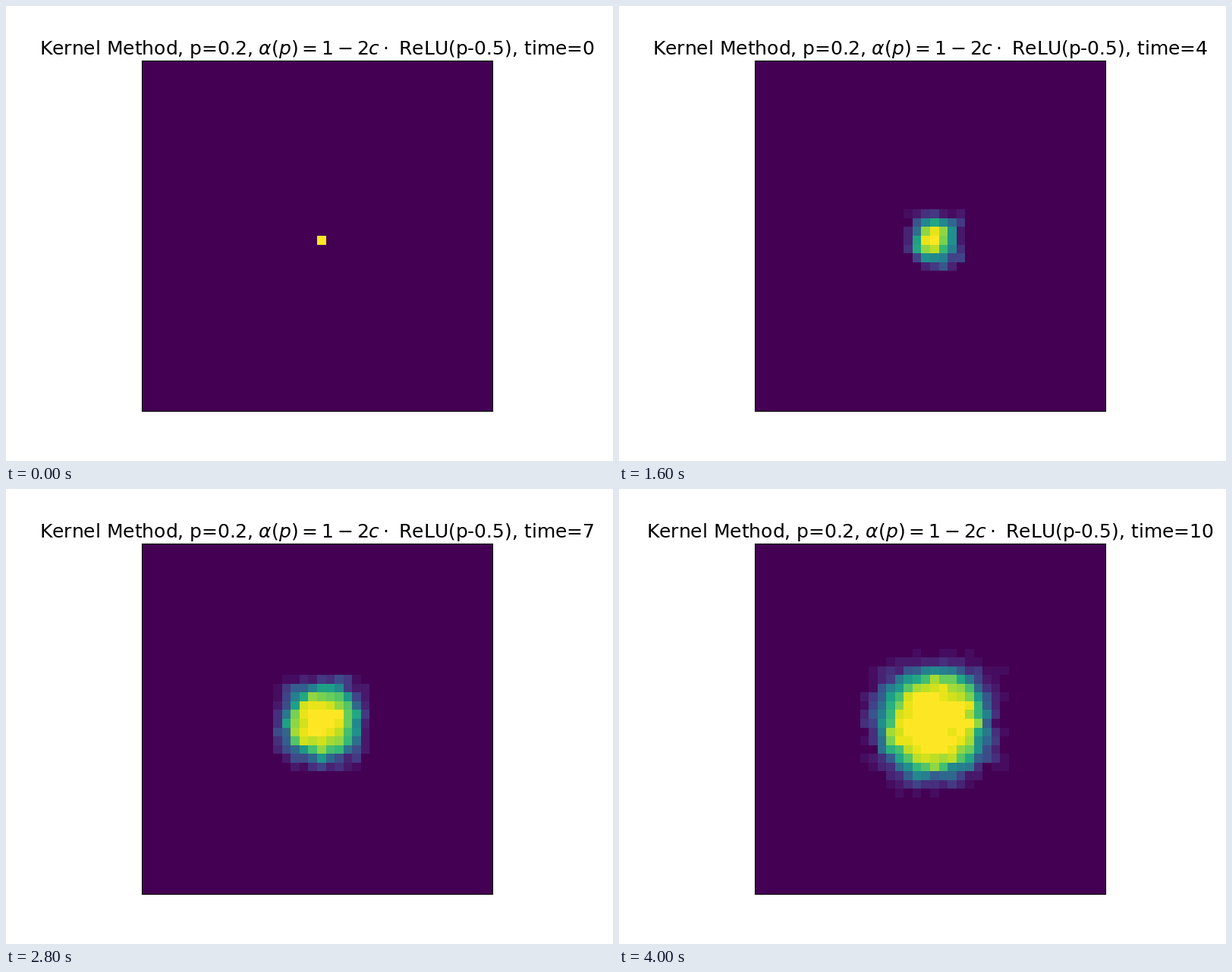
A matplotlib script for the animation above (4.4 s loop, 800 px wide and 600 px high).

```python
import numpy as np
import matplotlib.pyplot as plt
from matplotlib.animation import FuncAnimation

SIZE = 40
CENTER = SIZE // 2
RUNS = 30
STEPS = 11
P = 0.2

rng = np.random.default_rng(4)
rows, cols = np.indices((SIZE, SIZE))
distance = np.maximum(abs(rows - CENTER), abs(cols - CENTER))


def reach(step):
    """Largest distance from the seed that the front may have at a step."""
    return step - (step > 2) - (step > 6)


def count_neighbours(cells):
    shifts = [(dy, dx) for dy in (-1, 0, 1) for dx in (-1, 0, 1) if dy or dx]
    return sum(np.roll(cells, shift, axis=(1, 2)).astype(int) for shift in shifts)


def simulate():
    """Mean occupation of the grid over all runs, for every step."""
    cells = np.zeros((RUNS, SIZE, SIZE), dtype=bool)
    cells[:, CENTER, CENTER] = True
    means = [cells.mean(axis=0)]
    for step in range(1, STEPS):
        chance = 1 - (1 - P) ** count_neighbours(cells)
        grown = rng.random(cells.shape) < chance
        cells = cells | (grown & (distance <= reach(step)))
        means.append(cells.mean(axis=0))
    return means


def title_text(step):
    return rf"Kernel Method, p={P}, $\alpha(p)=1-2c\cdot$ ReLU(p-0.5), time={step}"


means = simulate()

plt.rcParams["font.family"] = "DejaVu Sans"
fig, ax = plt.subplots(figsize=(8, 6), dpi=100)
ax.set_xticks([])
ax.set_yticks([])
image = ax.imshow(means[0], cmap="viridis", vmin=0, vmax=1)
title = ax.set_title(title_text(0), fontsize=18)


def update(step):
    image.set_data(means[step])
    title.set_text(title_text(step))
    return image, title


animation = FuncAnimation(fig, update, frames=STEPS, interval=400, repeat=True)
plt.show()
```
